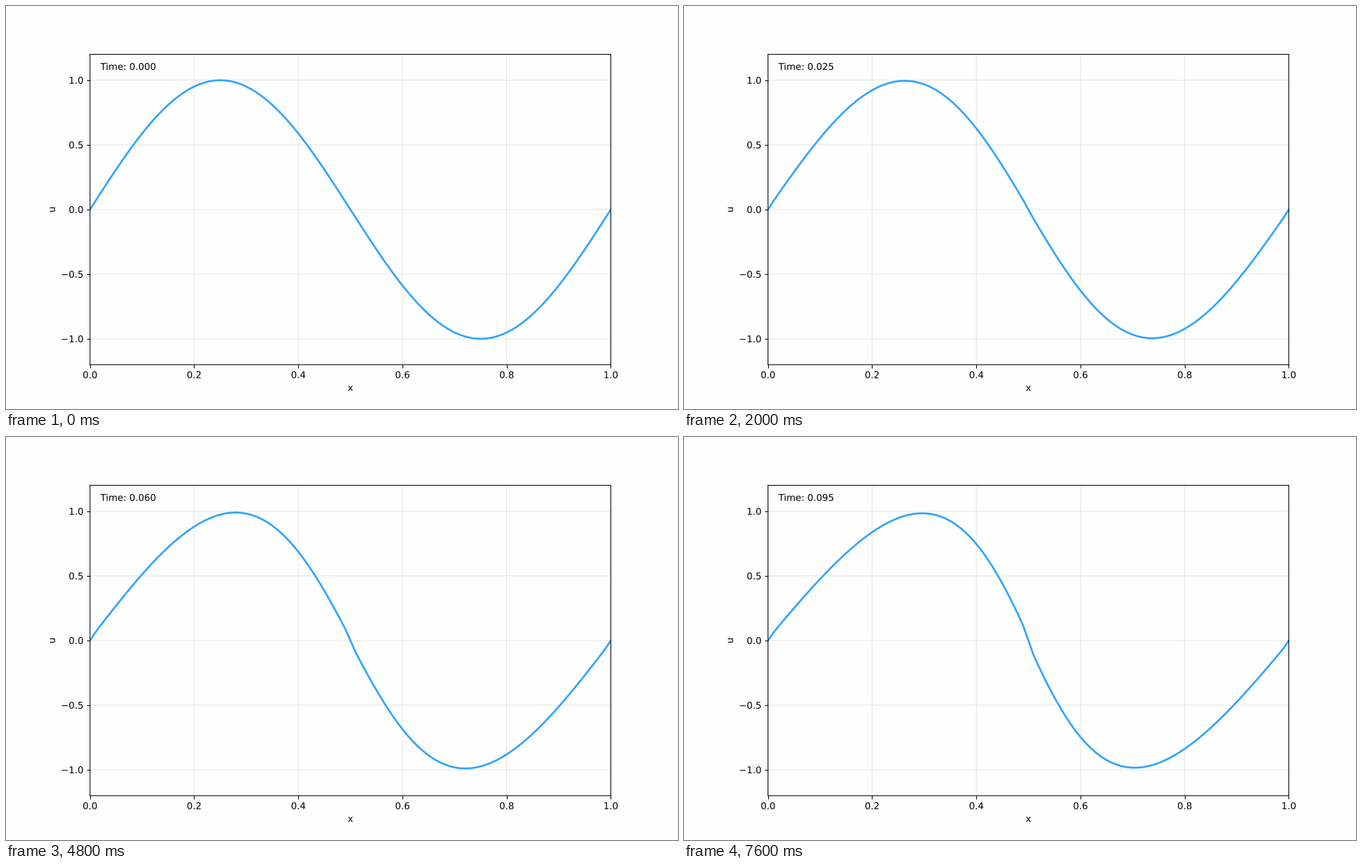
A matplotlib script that plays this animation: 966x580 px, repeating every 8 s.

```python
import numpy as np
import matplotlib.pyplot as plt
from matplotlib.animation import FuncAnimation
from matplotlib.patheffects import Normal

WIDTH, HEIGHT, DPI = 966, 580, 96.6
FRAMES, INTERVAL = 20, 400
TIME_STEP = 0.005          # simulated time per frame
CELLS = 100
BACKGROUND = "#fefefe"

# Unsnapped lines and outlined text give smooth, subpixel-placed edges.
plt.rcParams["path.snap"] = False
plt.rcParams["path.effects"] = [Normal()]

x = np.linspace(0, 1, CELLS + 1)


def advance(u):
    """One conservative upwind step of the Burgers equation, ends held at zero."""
    left, right = u[:-1], u[1:]
    mean_flux = (left**2 + right**2) / 4
    speed = np.maximum(abs(left), abs(right))
    flux = 0.5 * (mean_flux - speed * (right - left))
    u = u.copy()
    u[1:-1] -= TIME_STEP * CELLS * np.diff(flux)
    return u


def solve():
    states = [np.sin(2 * np.pi * x)]
    while len(states) < FRAMES:
        states.append(advance(states[-1]))
    return states


states = solve()

# The small margin guards against rounding down to one pixel less.
fig = plt.figure(figsize=((WIDTH + 0.01) / DPI, (HEIGHT + 0.01) / DPI),
                 dpi=DPI, facecolor=BACKGROUND)
ax = fig.add_axes([0.125, 0.11, 0.775, 0.77], facecolor=BACKGROUND)
ax.set(xlim=(0, 1), ylim=(-1.2, 1.2), xlabel="x", ylabel="u")
ax.set_yticks([-1, -0.5, 0, 0.5, 1])
ax.grid(True, alpha=0.3)

line, = ax.plot(x, states[0], color="#2fa4ff", lw=2)
label = ax.text(0.02, 0.95, "", transform=ax.transAxes)


def update(frame):
    line.set_ydata(states[frame])
    label.set_text(f"Time: {frame * TIME_STEP:.3f}")
    return line, label


animation = FuncAnimation(fig, update, frames=FRAMES, interval=INTERVAL,
                          repeat=True, repeat_delay=0)
plt.show()
```
